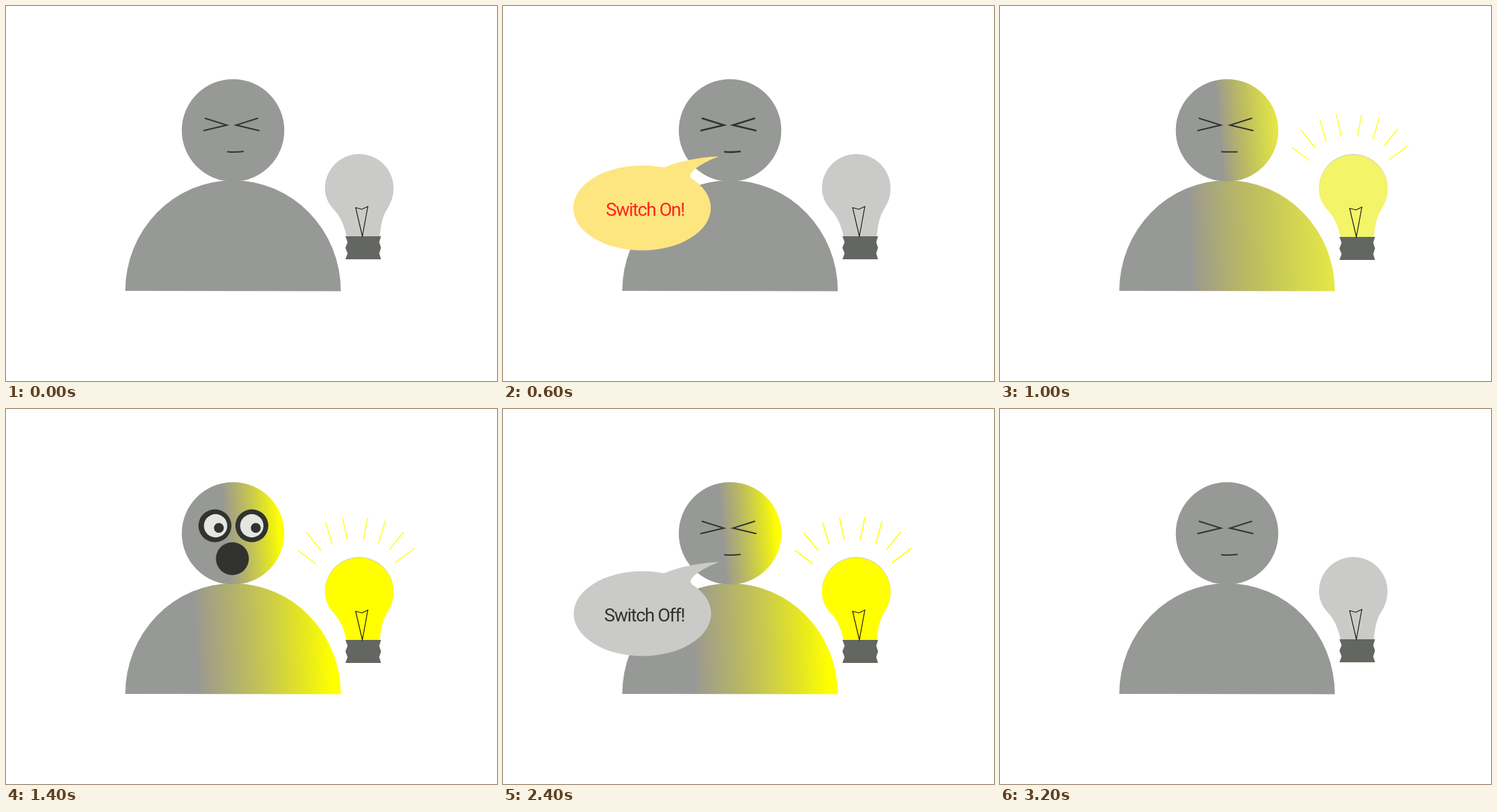
Recreate the animation shown at these times as an HTML page with a canvas. Size 745 by 570 pixels, loop 3.4 s.

```html
<!DOCTYPE html>
<html lang="en">
<head>
<meta charset="utf-8">
<title>Switch on, switch off</title>
<style>
html, body { margin: 0; width: 100%; height: 100%; overflow: hidden; background: #fff; }
canvas { display: block; }
</style>
</head>
<body>
<canvas id="stage" width="745" height="570"></canvas>
<script>
const ctx = document.getElementById('stage').getContext('2d');
const LOOP = 3400;
const GREY = '#979996', PALE = '#cacbc9', DARK = '#323330';

// Each step starts at `at` and is held until the next one.
const steps = [
  { at: 0 },
  { at: 200, bubble: 'on' },
  { at: 400 },
  { at: 600, bubble: 'on' },
  { at: 800, light: 'full' },
  { at: 1000, light: 'dim' },
  { at: 1200, light: 'full' },
  { at: 1400, light: 'full', awake: true },
  { at: 2000, light: 'full', bubble: 'off' },
  { at: 2200 },
  { at: 2400, light: 'full', bubble: 'off' },
  { at: 2600 }
];

const glow = {
  full: { bulb: '#ffff00', tones: ['#a09d8a', '#b3b26c', '#c9c94f', '#e2e326', '#ffff00'], end: 0.93 },
  dim: { bulb: '#f3f468', tones: ['#a09d8a', '#b3b26c', '#c4c45a', '#d4d850', '#e9e745'], end: 1 }
};

const rays = [
  [443, 215, 470, 235], [456.5, 188, 478, 215], [485, 172, 495, 206], [510.5, 165, 518, 199],
  [549, 165, 542, 199], [575.5, 170, 565.5, 204], [603.5, 187, 582, 213.5], [619.5, 212, 590, 234]
];

const bubbles = {
  on: { x: 211, y: 307, fill: '#fde57f', ink: '#ff2424', text: 'Switch On!', left: 156 },
  off: { x: 211.5, y: 311, fill: PALE, ink: DARK, text: 'Switch Off!', left: 153.5 }
};

function disc(x, y, r, fill) {
  ctx.beginPath();
  ctx.arc(x, y, r, 0, Math.PI * 2);
  ctx.fillStyle = fill;
  ctx.fill();
}

function trace(points) {
  ctx.beginPath();
  points.forEach(([x, y], i) => i ? ctx.lineTo(x, y) : ctx.moveTo(x, y));
}

function stroke(color, width) {
  ctx.strokeStyle = color;
  ctx.lineWidth = width;
  ctx.stroke();
}

function shade(light, x0, x1, y, slope) {
  if (!light) return GREY;
  const { tones, end } = glow[light];
  const g = ctx.createLinearGradient(x0, y, x1, y - (x1 - x0) * slope);
  g.addColorStop(0, GREY);
  g.addColorStop(0.01, GREY);
  tones.forEach((tone, i) => g.addColorStop(0.06 + (end - 0.06) * i / (tones.length - 1), tone));
  return g;
}

function drawPerson(light) {
  ctx.beginPath();
  ctx.moveTo(181, 433);
  ctx.ellipse(344.5, 433, 163.5, 168, 0, Math.PI, Math.PI * 2);
  ctx.lineTo(508, 433.5);
  ctx.closePath();
  ctx.fillStyle = shade(light, 286, 508, 350, 0.04);
  ctx.fill();
  disc(344.5, 189, 77.8, shade(light, 332, 422, 189, 0.08));
}

function drawAsleep(width, flatMouth) {
  trace([[301.5, 170.5], [335, 181], [299.5, 189.5]]);
  stroke(DARK, width);
  trace([[382.5, 170.5], [349, 181], [384.5, 189.5]]);
  stroke(DARK, width);
  ctx.beginPath();
  ctx.moveTo(335.5, 221.5);
  ctx.quadraticCurveTo(348, flatMouth ? 222 : 222.8, 360.5, flatMouth ? 221.7 : 221);
  stroke(DARK, width);
}

function drawAwake() {
  for (const x of [317, 373]) {
    disc(x, 177.5, 25, DARK);
    disc(x + (x < 344 ? 1 : 0), 177.5, 17.7, '#e3e6e1');
    disc(x + 6, 180.7, 7.5, DARK);
  }
  disc(343.5, 227.5, 25, DARK);
}

function drawGlass(fill) {
  ctx.beginPath();
  ctx.moveTo(517, 351);
  ctx.bezierCurveTo(513, 333, 507, 319, 497, 309);
  ctx.bezierCurveTo(488, 299, 484, 288, 484, 277);
  ctx.arc(536, 277, 52, Math.PI, 0);
  ctx.bezierCurveTo(588, 289, 585, 298, 577, 311);
  ctx.bezierCurveTo(571, 321, 569, 333, 567, 351);
  ctx.closePath();
  ctx.fillStyle = fill;
  ctx.fill();
}

function drawBulb(light) {
  drawGlass(PALE);
  ctx.save();
  if (light) {
    ctx.translate(0, 1);
    drawGlass(glow[light].bulb);
  }
  trace([
    [515, 350], [569, 350], [566.3, 359], [569, 367.5], [566.3, 376], [569, 385],
    [515, 385], [518.3, 376], [515, 367.5], [518.3, 359]
  ]);
  ctx.fillStyle = '#646662';
  ctx.fill();
  trace([[540.7, 350], [530.5, 306.5], [540, 309], [549, 304.8]]);
  ctx.closePath();
  stroke('#111', 1.15);
  ctx.restore();
}

function drawRays(width) {
  for (const [x0, y0, x1, y1] of rays) {
    trace([[x0, y0], [x1, y1]]);
    stroke('#ffff00', width);
  }
}

function drawBubble({ x, y, fill, ink, text, left }) {
  ctx.fillStyle = fill;
  ctx.beginPath();
  ctx.ellipse(x, y, 104.3, 64.5, 0, 0, Math.PI * 2);
  ctx.fill();
  ctx.beginPath();
  ctx.moveTo(x + 32, y - 61);
  ctx.quadraticCurveTo(x + 67, y - 76, x + 116.5, y - 78.5);
  ctx.bezierCurveTo(x + 88, y - 67, x + 68, y - 54, x + 74.5, y - 45);
  ctx.lineTo(x + 40, y - 30);
  ctx.closePath();
  ctx.fill();
  ctx.font = '28px Roboto, "Liberation Sans", sans-serif';
  ctx.letterSpacing = '-1.35px';
  ctx.fillStyle = ink;
  ctx.fillText(text, left, y + 11.5);
}

function draw(time) {
  const t = time % LOOP;
  const { light, bubble, awake } = steps.filter(s => s.at <= t).pop();
  ctx.fillStyle = '#fff';
  ctx.fillRect(0, 0, 745, 570);
  drawPerson(light);
  if (awake) drawAwake();
  else drawAsleep(bubble === 'on' ? 2.7 : 2.1, light === 'dim');
  drawBulb(light);
  if (light) drawRays(bubble ? 1.6 : 1.3);
  if (bubble) drawBubble(bubbles[bubble]);
}

function tick() {
  draw(performance.now());
  requestAnimationFrame(tick);
}
tick();
</script>
</body>
</html>
```
